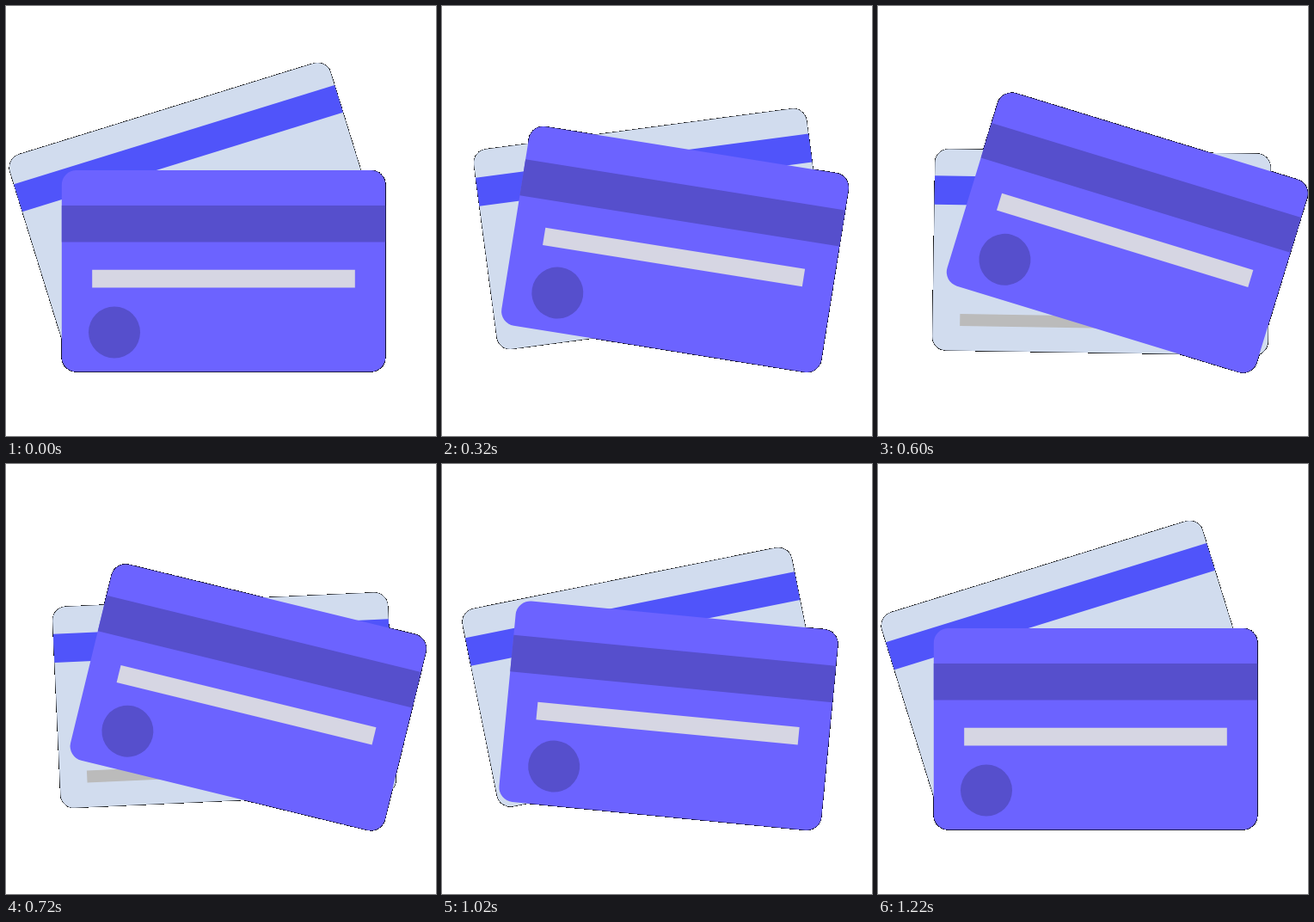
An HTML page with a canvas that plays this animation: 500x500 px, repeating every 1.26 s.

```html
<!DOCTYPE html>
<html lang="en">
<head>
<meta charset="utf-8">
<title>Cards</title>
<style>
  html, body { margin: 0; height: 100%; overflow: hidden; background: #fff; }
  canvas { display: block; }
</style>
</head>
<body>
<canvas id="stage" width="500" height="500"></canvas>
<script>
const ctx = document.getElementById('stage').getContext('2d', { willReadFrequently: true });
const LOOP = 1260, STEP = 20, PEAK = 600, END = 1220;

function box(color, x, y, w, h, radius = 0) {
  ctx.fillStyle = color;
  ctx.beginPath();
  ctx.roundRect(x, y, w, h, radius);
  ctx.fill();
}

function rotated(degrees, x, y, paint) {
  ctx.save();
  ctx.translate(x, y);
  ctx.rotate(degrees * Math.PI / 180);
  ctx.translate(-x, -y);
  paint();
  ctx.restore();
}

function backCard() {
  box('#d1dcee', 63.2, 166, 390.3, 234.3, 16);
  box('#5054fa', 63.2, 197.4, 390.3, 33.3);
  box('#bbbbbb', 95, 357.7, 185, 14);
}

function frontCard() {
  const shade = '#564fcc';
  box('#6c63ff', 64.8, 190.9, 376.4, 234.4, 17);
  box(shade, 64.8, 232, 376.4, 42.6);
  box('#d6d6e3', 100.2, 306.8, 305.6, 20.7);
  box(shade, 96, 349.5, 60, 60, 30);
}

// Soft edge pixels blend into black, which gives the thin broken outline.
function darkenEdges() {
  const image = ctx.getImageData(0, 0, 500, 500), px = image.data;
  for (let i = 0; i < px.length; i += 4) {
    const alpha = px[i + 3];
    if (alpha === 0 || alpha === 255) continue;
    for (let c = 0; c < 3; c++) px[i + c] *= alpha / 255;
    px[i + 3] = 255;
  }
  ctx.putImageData(image, 0, 0);
}

function draw(now) {
  const t = Math.floor(now % LOOP / STEP) * STEP;
  const open = t < PEAK ? t / PEAK : Math.max(0, (END - t) / (END - PEAK));
  ctx.clearRect(0, 0, 500, 500);
  rotated(-17.2 + 18.1 * open, 69, 381, backCard);
  rotated(17 * open, 420, 409, frontCard);
  darkenEdges();
}

const start = performance.now();
function tick() {
  draw(performance.now() - start);
  requestAnimationFrame(tick);
}
tick();
</script>
</body>
</html>
```
